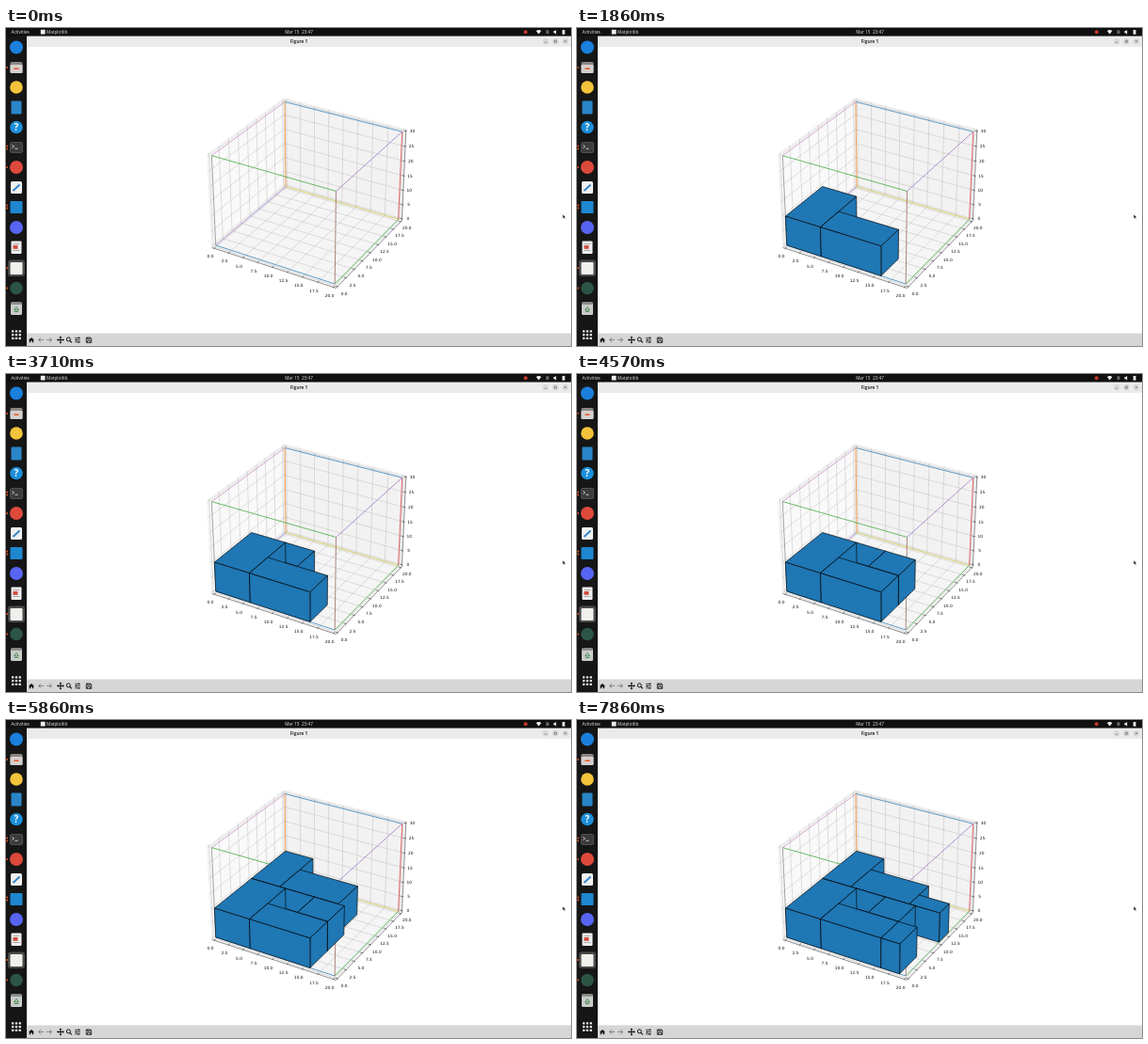
An HTML page that plays this animation: 600x338 px, repeating every 8000 ms.

```html
<!DOCTYPE html>
<html lang="en">
<head>
<meta charset="utf-8">
<title>Figure 1</title>
<style>
  html, body { margin: 0; width: 100%; height: 100%; overflow: hidden; background: #fff; }
  svg { display: block; width: 100vw; height: 100vh; }
  .ui { font-family: Ubuntu, "Open Sans", "Noto Sans", sans-serif; font-size: 4.7px; fill: #e8e8e8; }
  .tick { font-family: "DejaVu Sans", sans-serif; font-size: 4.34px; text-anchor: middle; fill: #111; }
</style>
</head>
<body>
<svg id="stage" viewBox="0 0 600 338" preserveAspectRatio="none">
  <rect width="600" height="338" fill="#fff"/>

  <!-- window frame -->
  <rect x="22" y="8" width="578" height="12" fill="#ebebeb"/>
  <text class="ui" x="311" y="15.9" text-anchor="middle" style="fill:#333;font-weight:700">Figure 1</text>
  <g fill="#d9d9d9"><circle cx="573" cy="14.2" r="3.2"/><circle cx="583.5" cy="14.2" r="3.2"/><circle cx="594" cy="14.2" r="3.2"/></g>
  <path d="M571.8 15.2h2.4M582.4 13.1h2.2v2.2h-2.2zM592.9 13.1l2.2 2.2m0-2.2l-2.2 2.2" fill="none" stroke="#444" stroke-width=".5"/>

  <g id="plot"></g>
  <g id="boxes"></g>

  <!-- figure toolbar -->
  <rect x="22" y="324.5" width="578" height="13.5" fill="#d6d6d6"/>
  <g fill="none" stroke="#111" stroke-width="1">
    <path d="M24 331.7l3-2.8 3 2.8h-.8v2.6h-1.4v-1.8h-1.6v1.8h-1.4v-2.6z" fill="#111" stroke="none"/>
    <path d="M40 331.5h-5.4m2.4-2.4l-2.5 2.4 2.5 2.4M43.200 331.5h5.400m-2.400-2.400l2.500 2.400-2.500 2.400" stroke="#858585"/>
    <path d="M54.600 331.500h6.600M57.900 328.200v6.600"/>
    <path d="M54 331.500l1.600-1.400v2.800zM61.800 331.500l-1.600-1.400v2.800zM57.900 327.600l-1.400 1.600h2.800zM57.900 335.400l-1.400-1.600h2.800z" fill="#111" stroke="none"/>
    <circle cx="66.300" cy="330.900" r="2"/><path d="M67.800 332.400l2 2" stroke-width="1.300"/>
    <path d="M73 329.400h6M73 331.600h6M73 333.800h6" stroke-width=".7"/>
    <path d="M77.200 328.500v1.800M74.700 330.700v1.800M77 332.900v1.800" stroke-width="1.100"/>
    <path d="M85.300 329h4.400l1 1v4.400h-5.400zM86.600 329v1.700h2.600v-1.700M86.400 334.300v-2h3.200v2" stroke-width=".8"/>
  </g>

  <!-- dock -->
  <rect y="8" width="22" height="330" fill="#161616"/>
  <rect x="2" y="246.500" width="18" height="17.500" rx="3" fill="#4a4a4a"/>
  <circle cx="11" cy="20.500" r="7" fill="#1b7fdc"/>
  <rect x="4.500" y="36" width="13" height="12" rx="1.500" fill="#8b8584"/><rect x="4.500" y="39" width="13" height="9" rx="1.300" fill="#d5cfcd"/><rect x="8.500" y="42.500" width="5" height="1.500" fill="#e95420"/>
  <circle cx="11" cy="63" r="6.800" fill="#f3c33b"/>
  <rect x="5.500" y="77.500" width="11" height="14" rx="1" fill="#2a86c8"/>
  <circle cx="11" cy="105.500" r="6.800" fill="#1c8fdb"/>
  <text x="11" y="109.200" text-anchor="middle" style="font:700 10px 'Open Sans',sans-serif;fill:#fff">?</text>
  <rect x="4.500" y="121.500" width="13" height="11" rx="1.500" fill="#3b3b3b" stroke="#777" stroke-width=".5"/>
  <path d="M6.500 124.500l2 1.500-2 1.500M9.500 128.300h3" fill="none" stroke="#eee" stroke-width=".8"/>
  <circle cx="11" cy="148" r="7" fill="#dd4a3c"/>
  <rect x="5" y="163" width="12" height="13" rx="1.500" fill="#f1f1f1"/><path d="M7.500 173l7-6.500" stroke="#3584c8" stroke-width="2"/>
  <rect x="4.500" y="184" width="13" height="13" rx="1" fill="#1f87cf"/>
  <circle cx="11" cy="212" r="7" fill="#5865f2"/>
  <rect x="5.500" y="226.500" width="11" height="13.500" rx="1" fill="#eee"/><path d="M7.500 229.500h7M7.500 236.500h7" stroke="#999" stroke-width=".8"/><rect x="7.500" y="231" width="5" height="3.800" fill="#d04a3c"/>
  <rect x="4.500" y="249" width="13" height="13" rx="1" fill="#f0f0ec"/>
  <circle cx="11" cy="276.500" r="6.800" fill="#2c5546"/>
  <rect x="5" y="291.500" width="12" height="13.500" rx="1.500" fill="#c9ccc9"/><rect x="5" y="291.500" width="12" height="2.500" rx="1" fill="#8d918e"/>
  <path d="M8.500 299.800l2.500-3.300 2.500 3.300zM9 301.500h4" fill="none" stroke="#4c8b57" stroke-width="1"/>
  <g id="dots"></g>

  <!-- top bar -->
  <rect width="600" height="8.600" fill="#101010"/>
  <rect x="36.800" y="1.800" width="4.800" height="4.800" fill="#ededed"/>
  <g class="ui">
    <text x="5.500" y="5.900">Activities</text>
    <text x="43" y="5.900">Matplotlib</text>
    <text x="311" y="5.900" text-anchor="middle" xml:space="preserve">Mar 15  23:47</text>
  </g>
  <circle cx="551.800" cy="4.200" r="2" fill="#c8372d"/>
  <path d="M563 3.200q2.700-2.200 5.400 0l-2.700 3.200z" fill="#eee"/>
  <rect x="573.500" y="2.300" width="3" height="3.800" fill="#666"/>
  <path d="M581.400 3.300h1.200l1.600-1.400v4.800l-1.600-1.400h-1.200z" fill="#eee"/>
  <rect x="590.700" y="2" width="2.800" height="4.800" rx=".5" fill="#eee"/>

  <path d="M591.300 198.200v4.100l1-.9.700 1.600.7-.3-.7-1.500h1.300z" fill="#111" stroke="#fff" stroke-width=".2"/>
</svg>
<script>
const LOOP = 8000, FIRST = 855, INTERVAL = 1000;
const $ = id => document.getElementById(id);

function add(parent, tag, attrs, text) {
  const el = document.createElementNS('http://www.w3.org/2000/svg', tag);
  for (const key in attrs) el.setAttribute(key, attrs[key]);
  if (text !== undefined) el.textContent = text;
  return parent.appendChild(el);
}

// Perspective view, elevation 30, azimuth -60; arguments are fractions of each axis.
const S3 = Math.sqrt(3);
function project([x, y, z]) {
  const u = (x - .5) * 8 / 7, v = (y - .5) * 8 / 7, w = (z - .5) * 6 / 7;
  const depth = 10 - (u * S3 / 4 - v * .75 + w / 2);
  const right = u * S3 / 2 + v / 2;
  const up = -u / 4 + v * S3 / 4 + w * S3 / 2;
  return [321.4 + 1268 * right / depth, 170.8 - 1268 * up / depth];
}
const points = list => list.map(p => project(p).map(n => n.toFixed(2)).join()).join(' ');
const line = (parent, list, stroke, width) =>
  add(parent, 'polyline', { points: points(list), fill: 'none', stroke, 'stroke-width': width });
const face = (parent, list, fill, stroke, width) =>
  add(parent, 'polygon', { points: points(list), fill, stroke, 'stroke-width': width, 'stroke-linejoin': 'round' });

function drawAxes() {
  const plot = $('plot'), lo = -1 / 48, hi = 1 + 1 / 48;
  const out = 1 / 120, inn = 1 / 60;
  face(plot, [[lo, lo, lo], [lo, hi, lo], [lo, hi, hi], [lo, lo, hi]], '#f9f9f9', '#d8d8d8', .4);
  face(plot, [[lo, hi, lo], [hi, hi, lo], [hi, hi, hi], [lo, hi, hi]], '#f2f2f2', '#d8d8d8', .4);
  face(plot, [[lo, lo, lo], [hi, lo, lo], [hi, hi, lo], [lo, hi, lo]], '#f5f5f5', '#d8d8d8', .4);

  const label = (p, text, dy) => {
    const [x, y] = project(p);
    add(plot, 'text', { class: 'tick', x, y: y + 1.55 + dy }, text);
  };
  const ticks = [];
  for (let i = 0; i <= 8; i++) {
    const t = i / 8, text = (i * 2.5).toFixed(1);
    line(plot, [[t, lo, lo], [t, hi, lo], [t, hi, hi]], '#b0b0b0', .4);
    line(plot, [[hi, t, lo], [lo, t, lo], [lo, t, hi]], '#b0b0b0', .4);
    ticks.push([[t, lo - out, lo], [t, lo + inn, lo]], [[hi + out, t, lo], [hi - inn, t, lo]]);
    label([t, -.075, -.075], text, 0);
    label([1.075, t, -.075], text, 0);
  }
  for (let i = 0; i <= 6; i++) {
    const t = i / 6;
    line(plot, [[lo, lo, t], [lo, hi, t], [hi, hi, t]], '#b0b0b0', .4);
    ticks.push([[hi + out, hi, t], [hi - inn, hi, t]]);
    label([1.055, 1.055, t], i * 5, .6);
  }
  line(plot, [[lo, lo, lo], [hi, lo, lo], [hi, hi, lo], [hi, hi, hi]], '#000', .4);
  ticks.forEach(t => line(plot, t, '#000', .4));

  const A = [0, 0], B = [1, 0], C = [1, 1], D = [0, 1];
  const edges = [
    [A, 0, D, 0, '#9467bd'], [D, 0, C, 0, '#d0c433'], [D, 0, D, 1, '#ff7f0e'], [D, 1, C, 1, '#1f77b4'],
    [C, 0, C, 1, '#d62728'], [A, 1, D, 1, '#bd83bd'], [A, 0, B, 0, '#1f77b4'], [B, 0, C, 0, '#2ca02c'],
    [A, 0, A, 1, '#7f7f7f'], [B, 0, B, 1, '#8c564b'], [A, 1, B, 1, '#2ca02c'], [B, 1, C, 1, '#9467bd']
  ];
  for (const [p, pz, q, qz, color] of edges) line(plot, [[...p, pz], [...q, qz]], color, .7);
}

// Painted back to front; step is the order of placement.
const HEIGHT = 10;
const boxes = [
  { step: 4, x: [0, 5], y: [10, 20] },
  { step: 5, x: [5, 15], y: [10, 16] },
  { step: 6, x: [15, 20], y: [10, 13] },
  { step: 2, x: [6, 11], y: [5, 10] },
  { step: 0, x: [0, 6], y: [0, 10] },
  { step: 3, x: [11, 16], y: [5, 10] },
  { step: 1, x: [6, 16], y: [0, 5] },
  { step: 7, x: [16, 19], y: [0, 5] }
];

function drawBox(box) {
  const [x0, x1] = box.x.map(n => n / 20), [y0, y1] = box.y.map(n => n / 20), h = HEIGHT / 30;
  box.el = add($('boxes'), 'g', { visibility: 'hidden' });
  [
    [[x0, y0, h], [x1, y0, h], [x1, y1, h], [x0, y1, h]],
    [[x1, y0, 0], [x1, y1, 0], [x1, y1, h], [x1, y0, h]],
    [[x0, y0, 0], [x1, y0, 0], [x1, y0, h], [x0, y0, h]]
  ].forEach(side => face(box.el, side, '#1f77b4', '#000', .65));
}

function drawDock() {
  for (const y of [42, 125.5, 128.5, 148, 188.5, 191.5, 255, 276.5])
    add($('dots'), 'circle', { cx: 1.2, cy: y, r: .9, fill: '#e95420' });
  for (let i = 0; i < 9; i++)
    add($('dots'), 'rect', { x: 6 + i % 3 * 3.8, y: 321.2 + Math.floor(i / 3) * 3.8, width: 2.3, height: 2.3, rx: .5, fill: '#f2f2f2' });
}

drawAxes();
boxes.forEach(drawBox);
drawDock();

const start = performance.now();
function tick() {
  const t = (performance.now() - start) % LOOP;
  for (const box of boxes)
    box.el.setAttribute('visibility', t >= FIRST + box.step * INTERVAL ? 'visible' : 'hidden');
  requestAnimationFrame(tick);
}
tick();
</script>
</body>
</html>
```
